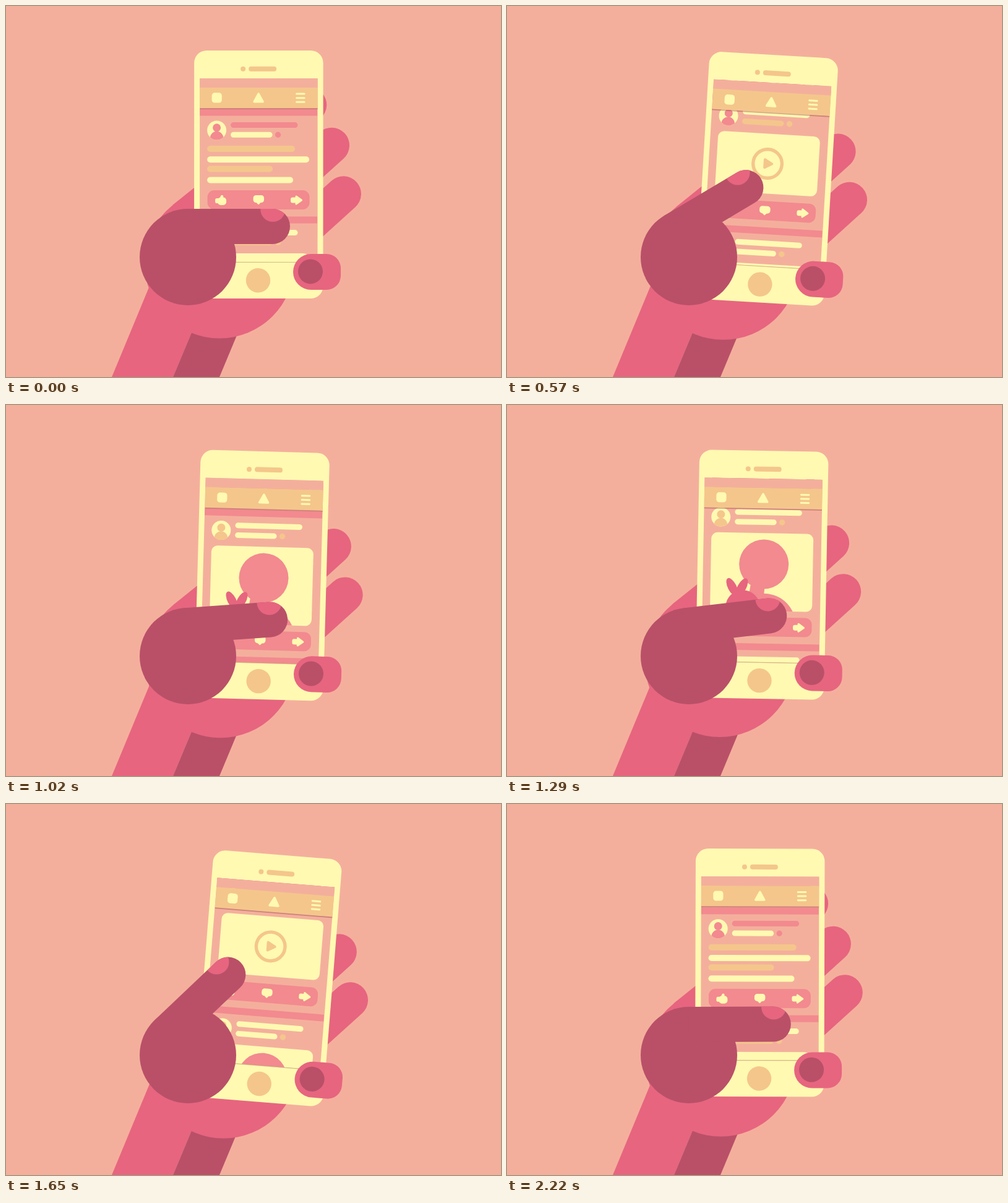
Write an HTML page that moves like this. It is 800 px wide and 600 px high and loops after 2.25 s.

```html
<!DOCTYPE html>
<html lang="en">
<head>
<meta charset="utf-8">
<title>Scrolling a feed</title>
<style>
  html, body { margin: 0; width: 100%; height: 100%; overflow: hidden; background: #f4af9c; }
  svg { display: block; width: 100%; height: 100%; }
</style>
</head>
<body>
<svg id="stage" viewBox="0 0 800 600" xmlns="http://www.w3.org/2000/svg"></svg>
<script>
const BG = '#f4af9c', CREAM = '#fff9b2', ORANGE = '#f4c68c',
      ROSE = '#f28a8f', PINK = '#e7657f', DARK = '#b95068';
const LOOP = 2250, STEP = 30;

// Shape helpers
const rect = (x, y, w, h, r, fill) =>
  `<rect x="${x}" y="${y}" width="${w}" height="${h}" rx="${r}" fill="${fill}"/>`;
const disc = (x, y, r, fill) => `<circle cx="${x}" cy="${y}" r="${r}" fill="${fill}"/>`;
const path = (d, fill, extra = '') => `<path d="${d}" fill="${fill}" ${extra}/>`;
const bar = (x, end, y, h, fill) => rect(x, y - h / 2, end - x, h, h / 2, fill);
const group = (attrs, ...parts) => `<g ${attrs}>${parts.join('')}</g>`;
const soft = (d, fill, w) =>
  path(d, fill, `stroke="${fill}" stroke-width="${w}" stroke-linejoin="round"`);
const clip = (id, shape) => `<clipPath id="${id}">${shape}</clipPath>`;

// Feed posts; y = 0 is the middle of the name line
function head(name, sub, dot, person) {
  return rect(313, -26, 190, 11, 0, ROSE) +
    group('transform="translate(340.5 8.5)"',
      disc(0, 0, 15.5, CREAM),
      group('clip-path="url(#face)"', disc(0, -4.2, 6.5, person), disc(0, 12.5, 10.8, person))) +
    bar(363, 471.5, 0, 9, name) +
    bar(363, 430.5, 15.7, 9, sub) +
    disc(439.5, 15.7, 4.7, dot);
}

function actions(y) {
  return group(`transform="translate(0 ${y})"`,
    rect(325.5, -15.5, 165, 31, 11, ROSE),
    rect(342, -4, 14, 12.5, 5, CREAM),
    rect(338, -2.5, 9, 8, 2.5, CREAM),
    path('M347.5 -1L349 -5.5', 'none', `stroke="${CREAM}" stroke-width="4.5" stroke-linecap="round"`),
    rect(399.5, -7.5, 17.5, 12, 4.5, CREAM),
    soft('M405.5 4H410.5L408 6.5Z', CREAM, 2),
    rect(460, -4, 11, 9, 3, CREAM),
    soft('M469 -5.5L477.5 .5L469 6.5Z', CREAM, 3));
}

const textPost = () =>
  head(ROSE, CREAM, ROSE, ROSE) +
  bar(325, 467, 38.5, 10, ORANGE) +
  bar(325, 490, 55.7, 10, CREAM) +
  bar(325, 431, 71, 10, ORANGE) +
  bar(325, 464, 89, 10, CREAM) +
  actions(121);

const videoPost = () =>
  head(CREAM, ORANGE, ORANGE, ROSE) +
  rect(325.5, 33.5, 165, 97, 10, CREAM) +
  `<circle cx="408" cy="82" r="23.3" fill="none" stroke="${ORANGE}" stroke-width="5.4"/>` +
  soft('M403.5 75.5V88.5L415 82Z', ORANGE, 4) +
  actions(158);

const ear = (x, tilt) =>
  `<ellipse rx="7" ry="16" fill="${PINK}" transform="translate(${x} 38) rotate(${tilt})"/>`;

const photoPost = () =>
  head(CREAM, CREAM, ORANGE, ORANGE) +
  rect(325.5, 33.5, 165, 126, 10, CREAM) +
  group('clip-path="url(#photo)"',
    group('transform="translate(411.3 83.7)"',
      disc(0, 0, 40, ROSE),
      path('M-20 28L-25 60H0L2 36Z', ROSE),
      disc(2, 99, 51.5, ROSE),
      disc(-33, 70, 27.7, PINK),
      ear(-50.5, -28), ear(-35, 28))) +
  actions(185);

const feed = [[textPost, 174], [videoPost, 211], [photoPost, 238], [videoPost, 211],
              [photoPost, 238], [textPost, 174], [videoPost, 211]];
let top0 = 192.5;
const posts = feed.map(([draw, height]) => {
  const g = group(`transform="translate(0 ${top0})"`, draw());
  top0 += height;
  return g;
});

const phone = [
  rect(304, 72, 208.5, 401, 20, CREAM),
  disc(383, 101.6, 4, ORANGE),
  bar(392, 437, 101.6, 8, ORANGE),
  rect(313, 117, 190.5, 297, 0, BG),
  group('clip-path="url(#screen)"',
    group('id="feed"', ...posts),
    rect(313, 117, 191, 15, 0, BG),
    rect(313, 132, 191, 33.2, 0, ORANGE),
    rect(313, 165.2, 191, 1.8, 0, 'rgba(150,65,75,.42)')),
  rect(313, 413.8, 190.5, 1.2, 0, 'rgba(150,90,70,.38)'),
  rect(332.5, 140.3, 16.2, 16.2, 4.5, CREAM),
  soft('M408 142L415 154.7H401Z', CREAM, 3.5),
  ...[142, 148.6, 155.2].map(y => bar(468, 483.5, y, 3, CREAM)),
  disc(407.5, 443.7, 19.7, ORANGE),
  path('M493 401H518a23 23 0 0 1 23 23V436a23 23 0 0 1 -23 23H493a29 29 0 0 1 0 -58Z', PINK),
  disc(492, 429.3, 20, DARK)
];

const finger = (x, y) => path(`M${x} ${y}l-74 67`, 'none',
  `stroke="${PINK}" stroke-width="57.5" stroke-linecap="round"`);

const thumb = 'M294 328H430.5a28.5 28.5 0 0 1 0 57H294Z';

const stage = document.getElementById('stage');
stage.innerHTML = [
  '<defs>',
  clip('face', disc(0, 0, 15.5, CREAM)),
  clip('photo', rect(325.5, 33.5, 165, 126, 10, CREAM)),
  clip('screen', rect(313, 117, 190.5, 297, 0, BG)),
  clip('tip', path(thumb, DARK)),
  '</defs>',
  rect(0, 0, 800, 600, 0, BG),
  path('M171 600L243.5 425H300V528L270 600Z', PINK),
  path('M270 600L315 492H390L345 600Z', DARK),
  group('id="palm"', disc(345, 416.5, 121, PINK),
    path('M269.1 322.1L339.3 265.7L402 344L345 416.5Z', PINK)),
  group('id="upper"', finger(489.5, 160), finger(526.3, 225.4)),
  group('id="ring"', finger(545.2, 304)),
  group('id="phone"', ...phone),
  disc(294, 406, 78, DARK),
  group('id="thumb"', path(thumb, DARK),
    group('clip-path="url(#tip)"', disc(431.3, 329, 20, PINK)))
].join('');

// Easing
const smooth = s => s * s * (3 - 2 * s);

function flick(x) {
  let lo = 0, hi = 1;
  for (let i = 0; i < 24; i++) {
    const s = (lo + hi) / 2, r = 1 - s;
    if (3 * r * r * s * 0.45 + 3 * r * s * s * 0.477 + s * s * s < x) lo = s; else hi = s;
  }
  return smooth(lo);
}

// Tracks: [time, value]; times before the first key belong to the end of the loop
const tracks = {
  thumb: [[0, 0], [560, -30.8], [1155, 0], [1710, -45], [2240, 0], [2250, 0]],
  phone: [[20, 0], [600, 3.45], [1230, 0.9], [1770, 5.15], [2270, 0]],
  hand: [[100, -1.5], [700, 11], [1270, -2.2], [1790, 16.4], [2350, -1.5]],
  scroll: [[0, 0], [1200, 397], [2250, 1072]]
};

function at(name, t, ease = smooth) {
  const keys = tracks[name];
  if (t < keys[0][0]) t += LOOP;
  let i = 1;
  while (i < keys.length - 1 && t > keys[i][0]) i++;
  const [t0, a] = keys[i - 1], [t1, b] = keys[i];
  return a + (b - a) * ease((t - t0) / (t1 - t0));
}

const part = {};
for (const id of ['palm', 'upper', 'ring', 'phone', 'feed', 'thumb'])
  part[id] = stage.querySelector('#' + id);
const move = (id, x, y) => part[id].setAttribute('transform', `translate(${x} ${y})`);
const turn = (id, deg, x, y) => part[id].setAttribute('transform', `rotate(${deg} ${x} ${y})`);

function pose(t) {
  const h = at('hand', t);
  move('palm', h * 0.5, h * 0.25);
  move('upper', h * 0.9, h * 1.04);
  move('ring', h * 0.85, h);
  turn('phone', at('phone', t), 300, 470);
  turn('thumb', at('thumb', t), 294, 406);
  move('feed', 0, -at('scroll', t, flick));
}

const start = performance.now();
function tick() {
  const t = (performance.now() - start) % LOOP;
  pose(Math.floor(t / STEP) * STEP);
  requestAnimationFrame(tick);
}
tick();
</script>
</body>
</html>
```
